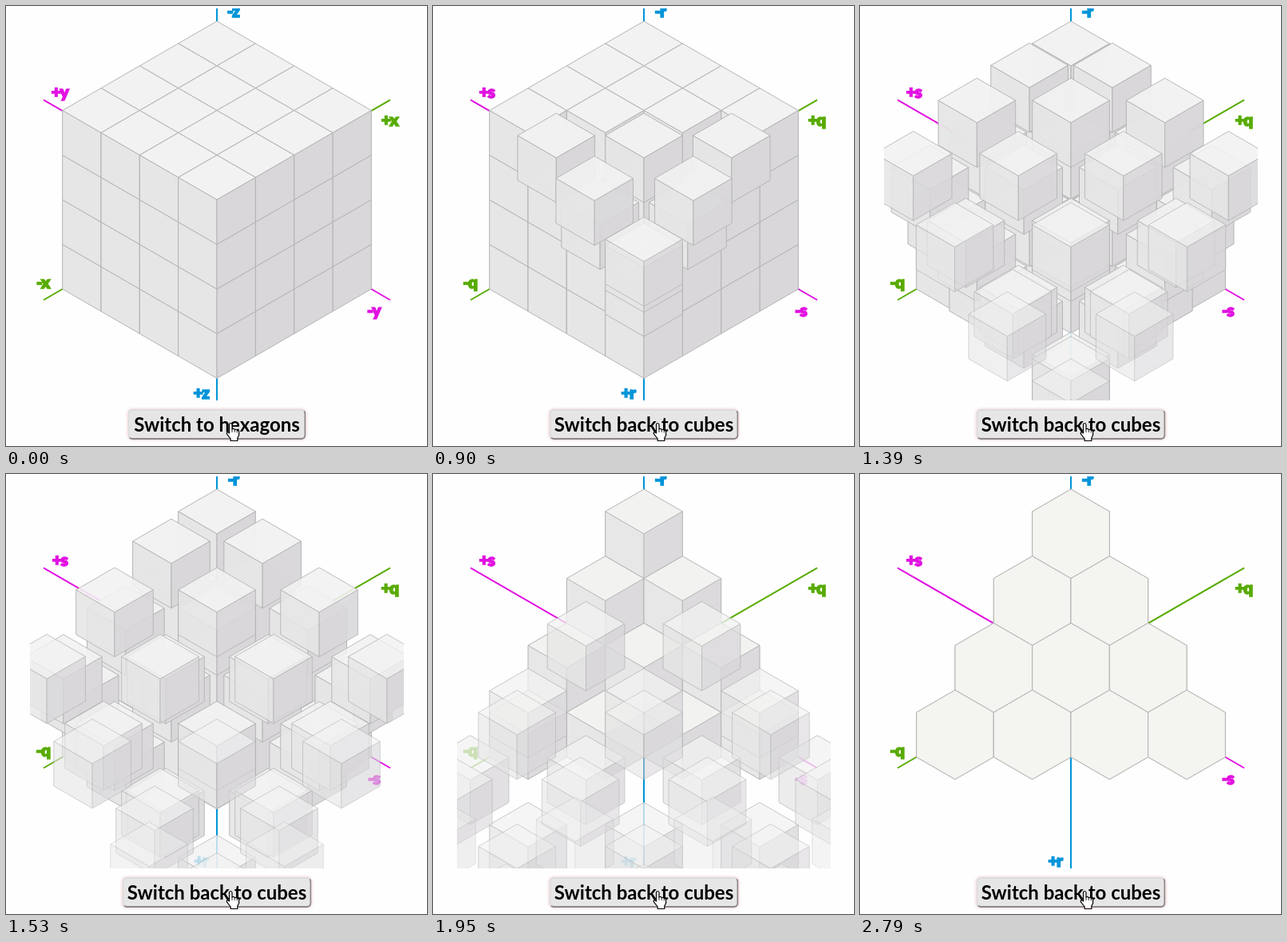
These frames come from a looping animation (527 px wide and 550 px high, 3710 ms). An HTML page:

```html
<!DOCTYPE html>
<html lang="en">
<head>
<meta charset="utf-8">
<title>Cubes to hexagons</title>
<style>
  html, body { margin: 0; width: 100%; height: 100%; overflow: hidden; background: #fefefe; }
  svg { position: absolute; left: 0; top: 0; }
  .axes path { fill: none; stroke-width: 2; }
  .labels text {
    font: 900 21px Lato, "Open Sans", sans-serif;
    letter-spacing: -1.5px; text-anchor: middle; stroke-width: 1.5;
  }
  .cube { stroke: #b4b4b4; stroke-width: 1; stroke-linejoin: round; }
  #button {
    position: absolute; left: 264px; top: 504px; height: 38px; box-sizing: border-box;
    transform: translateX(-50%);
    border: 2px solid; border-color: #dcdcdc #8c8888 #8c8888 #dcdcdc; border-radius: 6px;
    background: #e6e6e6; box-shadow: 0 0 3px 1px #f3d9db;
    font: 700 24px/33px Lato, "Open Sans", sans-serif;
    color: #000; text-align: center; white-space: nowrap;
  }
</style>
</head>
<body>
<div id="button"></div>
<svg id="stage" width="527" height="550" viewBox="0 0 527 550">
  <defs>
    <clipPath id="view"><rect x="30" y="3" width="468" height="490"/></clipPath>
    <g id="cube" class="cube">
      <path fill="#f2f2f2" d="M0 0L-48.33-27.9L0-55.8L48.33-27.9Z"/>
      <path fill="#e6e6e6" d="M0 0V55.8L-48.33 27.9V-27.9Z"/>
      <path fill="#d9d7da" d="M0 0V55.8L48.33 27.9V-27.9Z"/>
    </g>
    <path id="hex" class="cube" fill="#f4f4f0" d="M0-55.8L48.33-27.9V27.9L0 55.8L-48.33 27.9V-27.9Z"/>
  </defs>
  <g clip-path="url(#view)">
    <g class="axes">
      <path stroke="#58ab00" d="M47 367.5L481 117.3"/>
      <path stroke="#e112e1" d="M47 117.3L481 367.5"/>
      <path stroke="#0094d9" d="M264 3V493"/>
    </g>
    <g id="xyz" class="labels"></g>
    <g id="qsr" class="labels"></g>
    <g id="cubes"></g>
  </g>
  <path fill="#fff" stroke="#000" stroke-width="1.2" stroke-linejoin="round"
    d="M279.5 534V523.5Q279.5 521.5 281.2 521.5T283 523.5V529Q285.5 527.6 286.3 529.8Q288.6 528.6 289.4 530.8Q291.6 530 291.6 532.5V536.5L289.8 540V543.5H281.2V541L276.6 535.2Q275.6 532.6 277.6 532.6Z"/>
  <path stroke="#000" stroke-width=".8" d="M283 529V533M286.3 530V533M289.3 531V533.5"/>
</svg>
<script>
const LOOP = 3710, STEP = 70;
const H = 48.33, V = 27.9, CX = 264, CY = 74.8;
const LAG = 0.1437;
// Progress of the fall over time: [ms, phase]
const CLOCK = [[366, 0], [550, 0.145], [1110, 0.589], [1390, 0.792],
               [1670, 1.0075], [1950, 1.218], [2790, 1.862]];

const byId = id => document.getElementById(id);
const clamp = v => Math.max(0, Math.min(1, v));

function add(parent, tag, attrs) {
  const el = document.createElementNS("http://www.w3.org/2000/svg", tag);
  for (const k in attrs) el.setAttribute(k, attrs[k]);
  return parent.appendChild(el);
}

function addLabels(id, [g, m, b]) {
  const put = (text, x, y, color) => {
    add(byId(id), "text", { x, y, fill: color, stroke: color }).textContent = text;
  };
  put("+" + g, 480, 150, "#58ab00");
  put("-" + g, 46, 353, "#58ab00");
  put("+" + m, 67, 115, "#e112e1");
  put("-" + m, 460, 388, "#e112e1");
  put("+" + b, 244, 491, "#0094d9");
  put("-" + b, 284, 14, "#0094d9");
}
addLabels("xyz", "xyz");
addLabels("qsr", "qsr");

// a runs right-down, b left-down, c down; layer 0 is the plane that stays.
const cubes = [];
for (let a = 0; a < 4; a++)
  for (let b = 0; b < 4; b++)
    for (let c = 0; c < 4; c++)
      if (a + b >= c) cubes.push({ layer: a + b - c, dx: (a - b) * H, y: CY + V * (a + b + 2 * c) });
cubes.sort((p, q) => p.layer - q.layer);
for (const q of cubes) {
  const place = { transform: `translate(${CX + q.dx} ${q.y})` };
  q.el = add(byId("cubes"), "use", { href: "#cube", ...place });
  if (!q.layer) q.hex = add(byId("cubes"), "use", { href: "#hex", ...place });
}

function phaseAt(t) {
  if (t <= CLOCK[0][0]) return 0;
  const i = CLOCK.findIndex(k => k[0] >= t);
  if (i < 0) return 2;
  const [t0, p0] = CLOCK[i - 1], [t1, p1] = CLOCK[i];
  return p0 + (p1 - p0) * (t - t0) / (t1 - t0);
}

function drawCube(q, phase) {
  const u = clamp(phase - (6 - q.layer) * LAG);
  if (q.hex) {
    q.hex.setAttribute("opacity", u * u);
    return;
  }
  const x = CX + q.dx * (1 + u), y = q.y + 547 * u * u - 48 * u;
  q.el.setAttribute("transform", `translate(${x.toFixed(2)} ${y.toFixed(2)})`);
  q.el.setAttribute("opacity", 1 - u * u);
}

function draw(t) {
  const fade = clamp(Math.floor(t / STEP) * STEP / 210);
  byId("xyz").setAttribute("opacity", 1 - fade);
  byId("qsr").setAttribute("opacity", fade);
  const button = byId("button"), switched = t >= STEP;
  button.textContent = switched ? "Switch back to cubes" : "Switch to hexagons";
  button.style.width = switched ? "237px" : "223px";

  // The motion advances in steps of 70 ms.
  const phase = phaseAt(Math.floor((t - 60) / STEP) * STEP + 60);
  for (const q of cubes) drawCube(q, phase);
}

const start = performance.now();
function tick() {
  draw((performance.now() - start) % LOOP);
  requestAnimationFrame(tick);
}
tick();
</script>
</body>
</html>
```
